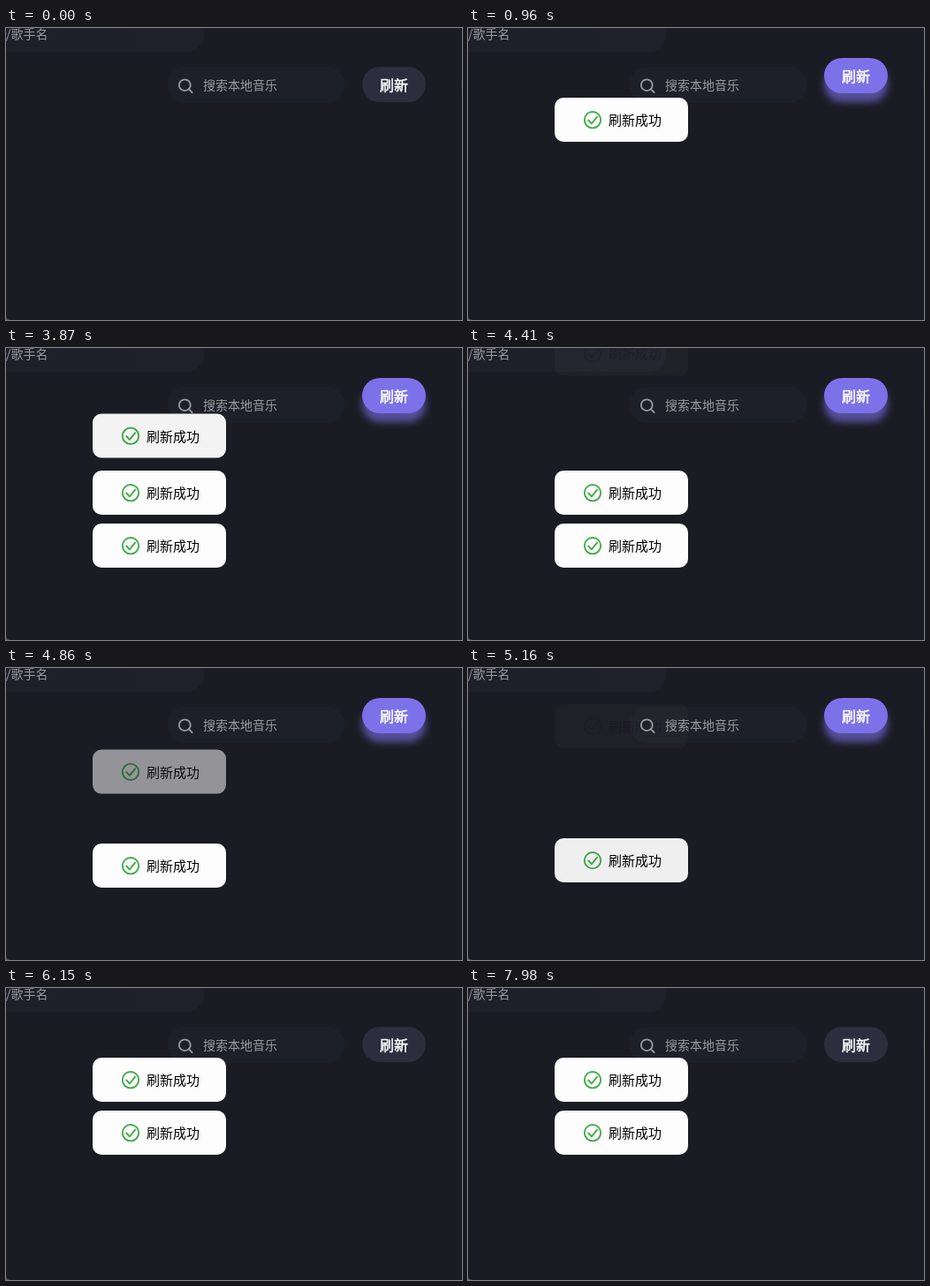
Animation, 516 px wide and 331 px high, one loop 8 s. Source, as an HTML page:

```html
<!DOCTYPE html>
<html lang="zh-CN">
<head>
<meta charset="utf-8">
<style>
  html, body { margin: 0; width: 100%; height: 100%; overflow: hidden; background: #1b1b23; }
  svg { display: block; width: 516px; height: 331px; font-family: "Noto Sans CJK SC", "Noto Sans CJK", sans-serif; }
  .hint { font-size: 14px; fill: #9c9c9f; }
  .label { font-size: 16px; fill: #fff; stroke: #fff; stroke-width: .5px; }
  #shadow { fill: #7b72e9; opacity: .62; filter: blur(4.2px); }
</style>
</head>
<body>
<svg viewBox="0 0 516 331">
  <defs>
    <linearGradient id="field">
      <stop offset="0" stop-color="#1c1f2a"/>
      <stop offset="1" stop-color="#1f2029"/>
    </linearGradient>
    <g id="toast">
      <rect width="151" height="50" rx="10" fill="#fdfdfd"/>
      <g fill="none" stroke="#43ad4a" stroke-width="1.9">
        <circle cx="43" cy="25.2" r="9.2"/>
        <path d="M38.3 25.5l3.6 3.8 6.2-7.6" stroke-linecap="round" stroke-linejoin="round"/>
      </g>
      <text x="61" y="31" font-size="15">刷新成功</text>
    </g>
  </defs>

  <rect width="516" height="331" fill="#1b1b23"/>
  <path d="M0 326v5h5a5 5 0 0 1-5-5" fill="#4a4a54"/>

  <rect x="-176" y="-14" width="400" height="41" rx="20" fill="url(#field)"/>
  <text class="hint" x="0" y="12">/歌手名</text>

  <rect x="183" y="44" width="200" height="41" rx="20" fill="#1e2029"/>
  <g fill="none" stroke="#9a9a9f" stroke-width="1.8" stroke-linecap="round">
    <circle cx="202.3" cy="64.7" r="6.4"/>
    <path d="M207 69.4l3.6 3.6"/>
  </g>
  <text class="hint" x="223" y="70">搜索本地音乐</text>

  <rect x="515" y="44" width="72" height="40" rx="20" fill="#2e2d3d"/>
  <g id="button">
    <rect id="shadow" x="403" y="54" width="72" height="40" rx="20"/>
    <rect id="pill" x="403" y="44" width="72" height="40" rx="20"/>
    <text class="label" x="423" y="71">刷新</text>
  </g>
  <g id="toasts"></g>
</svg>
<script>
const LOOP = 8000, LEAVE_TIME = 580, REMOVE_AFTER = 770, HOVER_TIME = 180;
const byId = id => document.getElementById(id);
const clamp = v => Math.min(1, Math.max(0, v));

// Hover intervals of the refresh button
const hovers = [[530, 5985], [6800, 7815]];

const toasts = [
  { y: 79, show: 960, leave: 3845 },
  { y: 139, show: 1710, leave: 4592 },
  { y: 199, show: 2250, leave: 5126 },
  { y: 79, show: 5430, leave: Infinity },
  { y: 139, show: 5610, leave: Infinity }
];
for (const toast of toasts) {
  toast.node = document.createElementNS("http://www.w3.org/2000/svg", "use");
  toast.node.setAttribute("href", "#toast");
  byId("toasts").append(toast.node);
}

// CSS "ease": cubic-bezier(.25, .1, .25, 1)
function ease(x) {
  let lo = 0, hi = 1, u = .5;
  for (let i = 0; i < 20; i++) {
    u = (lo + hi) / 2;
    const bx = .75 * u * (1 - u) + u ** 3;
    if (bx < x) lo = u; else hi = u;
  }
  return .3 * u * (1 - u) ** 2 + 3 * u * u * (1 - u) + u ** 3;
}

function drawButton(t) {
  let lift = 0, hovered = false;
  for (const [enter, exit] of hovers) {
    if (t < enter) continue;
    hovered = t < exit;
    const p = ease(clamp((t - (hovered ? enter : exit)) / HOVER_TIME));
    lift = hovered ? p : 1 - p;
  }
  byId("button").setAttribute("transform", `translate(0 ${(-10 * lift).toFixed(2)})`);
  byId("pill").setAttribute("fill", hovered ? "#7b72e9" : "#2e2d3d");
  byId("shadow").style.display = hovered ? "" : "none";
}

// A leaving toast rises and fades, and a faint trace lingers until it is removed
function drawToast({ node, y, show, leave }, t) {
  const p = Math.min(.988, clamp((t - leave) / LEAVE_TIME));
  node.setAttribute("transform", `translate(98 ${y - 100 * p})`);
  node.setAttribute("opacity", 1 - p);
  node.style.display = t >= show && t < leave + REMOVE_AFTER ? "" : "none";
}

const start = performance.now();
function frame() {
  const t = (performance.now() - start) % LOOP;
  drawButton(t);
  toasts.forEach(toast => drawToast(toast, t));
  requestAnimationFrame(frame);
}
frame();
</script>
</body>
</html>
```
